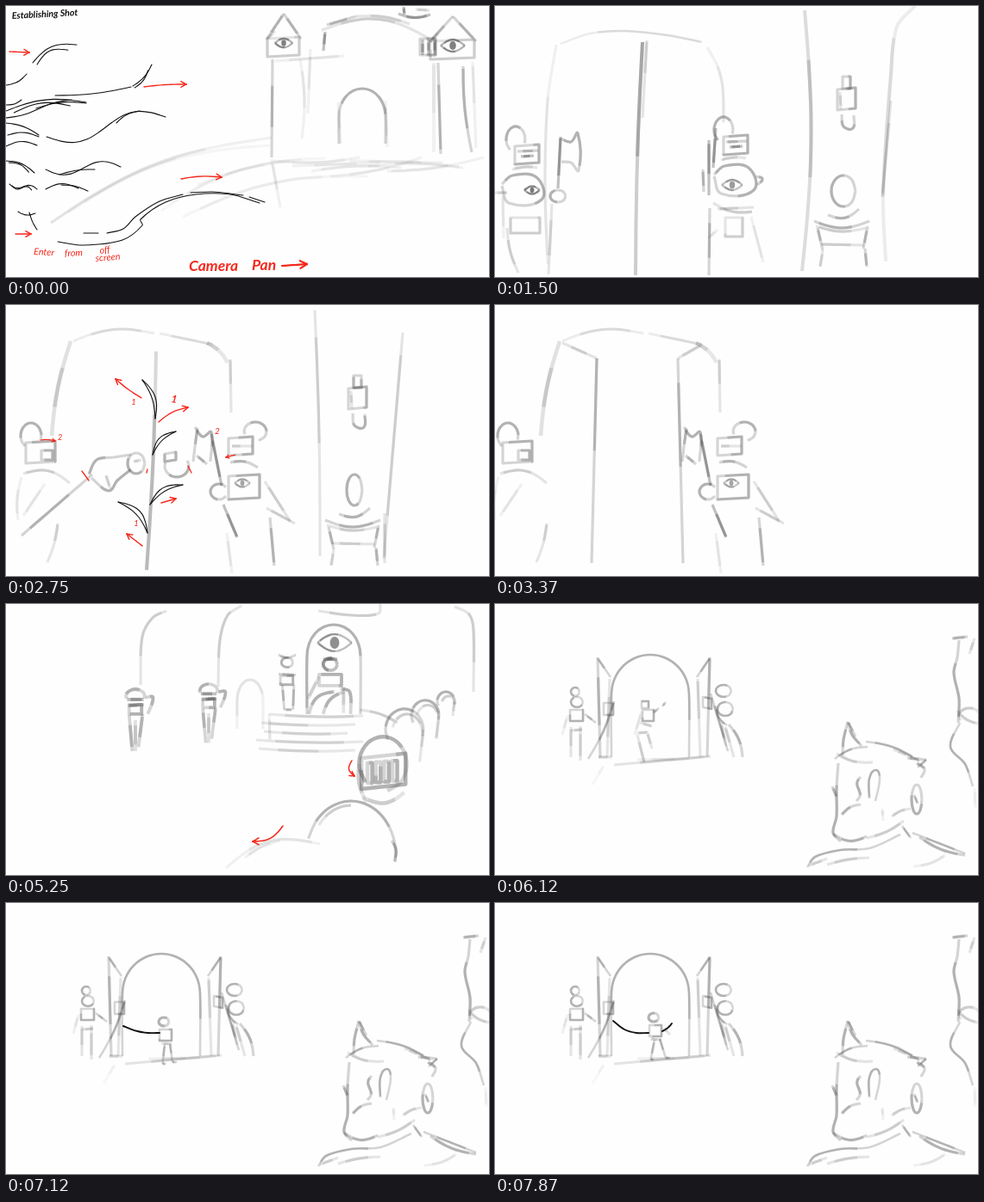
Recreate the animation shown at these times as an HTML page. Size 560 by 315 pixels, loop 8000 ms.

```html
<!DOCTYPE html>
<html lang="en">
<head>
<meta charset="utf-8">
<title>Storyboard</title>
<style>
html, body { margin: 0; width: 100%; height: 100%; overflow: hidden; background: #fefefe; }
svg { display: block; width: 100vw; height: 100vh; }
path { fill: none; stroke-linejoin: round; }
text { font-family: Lato, Inter, sans-serif; font-style: italic; }
</style>
</head>
<body>
<svg id="stage" viewBox="0 0 560 315"></svg>
<script>
const RED = '#f5281c', INK = '#111', PENCIL = '#4c4c4c', DUR = 8000, TAU = Math.PI * 2;

let seed = 7;
const rnd = () => (seed = seed * 16807 % 2147483647) / 2147483647;
const mix = (a, b, t) => a + (b - a) * t;
const times = (n, f) => Array.from({ length: n }, (_, i) => f(i, n > 1 ? i / (n - 1) : 0));
const parse = s => s.trim().split(/\s+/).map(p => p.split(',').map(Number));

// Smooth curve through points, with handles a third of each span long
function smooth(p) {
  const dir = i => {
    const a = p[Math.max(i - 1, 0)], b = p[Math.min(i + 1, p.length - 1)];
    const l = Math.hypot(b[0] - a[0], b[1] - a[1]) || 1;
    return [(b[0] - a[0]) / l, (b[1] - a[1]) / l];
  };
  let d = 'M' + p[0];
  for (let i = 1; i < p.length; i++) {
    const [a, b] = [p[i - 1], p[i]], [u, v] = [dir(i - 1), dir(i)];
    const l = Math.hypot(b[0] - a[0], b[1] - a[1]) / 3;
    const c = [a[0] + u[0] * l, a[1] + u[1] * l, b[0] - v[0] * l, b[1] - v[1] * l, ...b];
    d += 'C' + c.map(n => n.toFixed(1));
  }
  return d;
}

// A pen draws strokes; a soft one presses harder somewhere along the way
function pen(col, w, op = 1, soft = false) {
  const put = d => {
    const one = (o, more) => `<path d="${d}" stroke="${col}" stroke-width="${w}" stroke-opacity="${o.toFixed(2)}" ${more}/>`;
    if (!soft) return one(op, 'stroke-linecap="round"');
    const gap = (rnd() * .3).toFixed(2), run = (.4 + rnd() * .35).toFixed(2);
    return one(op * .58, '') + one(op * .62, `pathLength="1" stroke-dasharray="0 ${gap} ${run} 2"`);
  };
  const line = p => put(smooth(p));
  const round = (x, y, rx, ry, from, to) => times(9, (i, t) => {
    const a = TAU * mix(from, to, t);
    return [x + rx * Math.cos(a), y + ry * Math.sin(a)];
  });
  return {
    path: s => s.split('|').map(q => line(parse(q))).join(''),
    bow(x0, y0, x1, y1, bend = 0, humps = 1) {
      const l = Math.hypot(x1 - x0, y1 - y0);
      return line(times(2 + 4 * humps, (i, t) => {
        const k = bend * Math.sin(Math.PI * humps * t) / l;
        return [mix(x0, x1, t) - (y1 - y0) * k, mix(y0, y1, t) + (x1 - x0) * k];
      }));
    },
    ring: (x, y, rx, ry = rx, from = 0, to = 1) => line(round(x, y, rx, ry, from, to)),
    box: (x, y, w, h, tilt = 0) => put(`M${x},${y}L${x + w},${y - tilt}L${x + w},${y + h - tilt}L${x},${y + h}Z`),
    arch: (x, top, r, foot, rise = r) => line([[x - r, foot], ...round(x, top + rise, r, rise, .5, 1), [x + r, foot]])
  };
}
const gray = (op, w = 3.2) => pen(PENCIL, w, op, true);
const faint = gray(.13), light = gray(.24), mid = gray(.4), dark = gray(.6), fine = gray(.4, 2.6);
const ink = pen(INK, 1.1), red = pen(RED, 1.3), thin = pen(RED, 1);

const move = (x, y, body, sx = 1, sy = Math.abs(sx)) => `<g transform="translate(${x} ${y}) scale(${sx} ${sy})">${body}</g>`;
const word = (x, y, size, str, col = RED, turn = 0, weight = 400) =>
  `<text x="${x}" y="${y}" font-size="${size}" fill="${col}" font-weight="${weight}" transform="rotate(${turn} ${x} ${y})">${str}</text>`;
function arrow(x0, y0, x1, y1, bend = 0, w = 1.4, size = 7) {
  const p = pen(RED, w), a = Math.atan2(y1 - y0, x1 - x0) - bend * 3 / Math.hypot(x1 - x0, y1 - y0);
  const wing = k => p.bow(x1 - size * Math.cos(a + k), y1 - size * Math.sin(a + k), x1, y1);
  return p.bow(x0, y0, x1, y1, bend) + wing(.5) + wing(-.5);
}
function eye(x, y, r, op = .6) {
  const p = gray(op, 2.3);
  return p.bow(x - r, y, x + r, y, -r * .5) + p.bow(x - r, y, x + r, y, r * .5) +
    `<ellipse cx="${x}" cy="${y}" rx="${r * .27}" ry="${r * .35}" fill="${PENCIL}" fill-opacity="${op}"/>`;
}

// --- Castle ---
const tower = (x, r, top) =>
  mid.bow(x - r, top + 30, x, top) + mid.bow(x, top, x + r, top + 29) +
  light.box(x - r + 1, top + 29, r * 2 - 3, 21, 2) + light.bow(x - r, top + 30, x - r + 10, top + 20) + eye(x, top + 34, r * .52, .7);
const castle =
  faint.bow(52, 252, 308, 153, -20) + gray(.08).bow(72, 240, 306, 162, -20) + gray(.08).bow(180, 238, 330, 180, -12) +
  gray(.09).bow(205, 245, 420, 198, -16) + gray(.08).bow(222, 208, 370, 177, -8) +
  times(7, i => gray(.12).bow(310 + i * 22, 180 + i % 4 * 6, 410 + i * 24, 176 + i % 3 * 6, 4 - i % 3 * 4)).join('') +
  tower(322, 20, 9) + tower(518, 27, 12) +
  mid.bow(309, 62, 308, 176) + faint.bow(308, 178, 318, 234) + faint.bow(312, 64, 392, 58) +
  faint.bow(341, 62, 343, 154, -4) + faint.bow(353, 50, 350, 125) +
  dark.bow(370, 30, 368, 52) + mid.bow(372, 22, 406, 12) + light.bow(366, 28, 491, 38, -18) + light.bow(406, 12, 468, 21, -4) +
  dark.bow(455, 9, 492, 10, 4) + dark.bow(461, 1, 462, 10) + light.bow(475, 4, 491, 5) +
  times(3, i => dark.bow(483 + i * 7, 39, 483 + i * 7, 57)).join('') + mid.box(480, 38, 18, 19) +
  mid.bow(501, 66, 504, 172) + mid.bow(530, 70, 540, 170, 3) + gray(.12, 4).bow(496, 66, 496, 170) + faint.bow(541, 65, 545, 165) +
  mid.arch(413, 96, 27, 160, 32) + faint.bow(385, 112, 388, 160) + faint.bow(440, 110, 442, 164);

// Each wave is a broken line, some with a second try beside it
const wave = (x0, y0, x1, y1, bend, humps = 1, again = false) =>
  ink.bow(x0, y0, x1, y1, bend, humps) + (again ? ink.bow(mix(x0, x1, .1), y0 + 2, mix(x0, x1, .8), mix(y0, y1, .8) + 2, bend * .9, humps) : '');
const waves =
  wave(31, 66, 82, 45, -9, 1, true) + wave(0, 92, 24, 79, 3) + wave(147, 93, 169, 68, 3, 1, true) + wave(57, 104, 145, 94, 3) +
  wave(0, 122, 93, 112, -8, 1, true) + wave(0, 130, 76, 109, 2, 2) + wave(0, 115, 18, 109, 2) + wave(35, 119, 93, 113, -4) +
  wave(0, 136, 38, 150, -3) + wave(2, 150, 38, 152, -4) + wave(0, 163, 36, 162, -5) + wave(47, 152, 185, 129, 12, 2) +
  wave(128, 136, 155, 122, -3) + wave(0, 180, 33, 194, -4, 1, true) + wave(46, 190, 133, 187, 7, 2) + wave(62, 196, 103, 190, -2) +
  wave(4, 207, 36, 213, 3, 2, true) + wave(46, 213, 84, 212, -6) + wave(64, 208, 95, 215, -2) +
  wave(27, 240, 36, 260, 1) + wave(14, 239, 34, 241, 3) +
  ink.path('60,274 90,278 135,272 158,255 156,248 185,228 220,219 260,219 294,229|90,264 107,264|117,264 136,259 150,245 178,227 205,219|214,217 240,216 275,220|282,222 300,228');

const pan = castle + waves + word(7, 15, 10.6, 'Establishing Shot', INK, -3, 700) +
  arrow(4, 53, 27, 54) + arrow(160, 94, 209, 91, -1) + arrow(203, 201, 250, 199, -2) + arrow(11, 265, 29, 265) + arrow(320, 302, 349, 300, 0, 2.2, 9) +
  word(32, 289, 10.8, 'Enter', RED, 3) + word(68, 291, 10.8, 'from', RED, -2) +
  word(109, 288, 10.8, 'off', RED, -8) + word(104, 297, 10.8, 'screen', RED, -5) +
  word(212, 308, 17.5, 'Camera', RED, 0, 700) + word(285, 307, 17.5, 'Pan', RED, 0, 700);

// --- Great doors ---
const bust = (x, y, helm, low) =>
  mid.ring(x + helm, y - 8, 11, 15, .35, 1.05) + mid.box(x, y, 28, 21, 2) + dark.bow(x + 7, y + 12, x + 22, y + 11) + mid.bow(x + 3, y + 6, x + 27, y + 5) +
  light.bow(x - 3, y + 27, x + 26, y + 25, -2) + mid.path(`${x + low},${y + 44} ${x + low + 12},${y + 34} ${x + low + 40},${y + 36} ${x + low + 46},${y + 62} ${x + low + 8},${y + 66} ${x + low},${y + 46}`);
function statue(head) {
  return mid.box(403, 82, 9, 14) + mid.box(397, 97, 21, 24, 2) + light.bow(400, 100, 401, 120) + mid.path('402,126 404,140 415,142 416,127') +
    mid.ring(404, 215, head, 18) + mid.bow(386, 243, 422, 236, 7) + mid.bow(370, 250, 434, 250, 8) + light.bow(372, 256, 430, 258, 5) +
    mid.bow(374, 258, 380, 284) + mid.bow(432, 256, 427, 282) + light.bow(378, 277, 428, 278) + light.bow(380, 284, 377, 303) + mid.bow(429, 282, 431, 303);
}
const hall =
  faint.path('61,300 58,210 61,110 71,45') + faint.path('246,48 258,70 264,95 265,136') + gray(.17, 2.5).path('76,44 110,32 150,29 200,34 240,42') + light.bow(66, 230, 62, 312) +
  gray(.48, 4).bow(171, 42, 163, 313, 2) + light.bow(176, 40, 171, 130) +
  bust(23, 163, 1, -15) + eye(43, 214, 9, .75) + bust(265, 152, 0, -11) + eye(275, 208, 12, .55) +
  dark.bow(76, 152, 73, 212) + mid.path('76,154 88,158 96,148 97,191 88,182 77,181') + mid.ring(73, 221, 9, 7) + light.bow(0, 217, 14, 217) +
  light.box(18, 246, 34, 18) + light.box(267, 246, 20, 22) + faint.bow(9, 220, 10, 270) + light.bow(14, 258, 27, 310, 3) +
  dark.bow(248, 156, 248, 220) + dark.bow(256, 142, 253, 188) + mid.bow(241, 190, 242, 216) + mid.bow(249, 235, 248, 313) +
  mid.path('302,198 310,201 304,208') + light.bow(258, 236, 300, 234) + light.bow(253, 229, 298, 239, 5) + faint.bow(297, 245, 311, 298) + faint.bow(258, 260, 247, 270) +
  gray(.33, 4).bow(359, 5, 356, 308, -9) + gray(.17, 4).path('487,0 466,24 459,80 450,220 453,297') + light.bow(459, 110, 449, 222) + statue(14);

const frame =
  gray(.27, 4.5).bow(75, 42, 53, 152, 4) + gray(.17, 3).bow(78, 42, 172, 33, -9) + gray(.17, 3).bow(178, 33, 240, 46) +
  gray(.22, 4.5).bow(233, 44, 257, 67, -3) + light.bow(260, 63, 261, 125) + light.bow(60, 254, 48, 299, -2);
const guardL = mid.ring(29, 152, 12, 15, .35, 1.05) + mid.box(23, 160, 34, 24, 2) + mid.box(41, 169, 13, 11) +
  light.bow(20, 196, 74, 207, -9) + faint.bow(18, 200, 14, 250, 3) + faint.bow(45, 208, 20, 245);
const spear = mid.bow(18, 268, 100, 197) + mid.path('96,197 105,180 125,177 145,174|99,201 119,216 129,204 145,191') + light.bow(116, 198, 121, 214) +
  mid.ring(151, 184, 10, 12) + light.bow(148, 182, 157, 180);
const guardR =
  mid.path('222,143 219,165 217,182|219,142 228,153 238,148 237,182|221,175 233,185') + mid.ring(289, 147, 13, 11, .45, 1.2) + mid.box(258, 155, 28, 20, 2) + light.bow(262, 164, 286, 164) +
  mid.bow(260, 183, 292, 189, -4) + mid.box(258, 199, 36, 27, 2) + mid.ring(247, 217, 10, 9, .1, .9) + dark.bow(238, 150, 250, 210) + dark.bow(252, 232, 268, 270) + eye(274, 207, 9, .5) +
  light.bow(300, 205, 330, 252) + light.bow(302, 236, 335, 254) + faint.bow(256, 265, 262, 312) + mid.bow(306, 247, 311, 303);
const leaf = (x0, y0, x1, y1, bend) => ink.bow(x0, y0, x1, y1, bend) + ink.bow(x0, y0, x1, y1, bend * .5);
const doors = frame + guardL + spear + guardR + mid.box(184, 173, 13, 9, 2) + mid.ring(198, 187, 14, 13, -.08, .55) +
  gray(.36, 4).bow(174, 54, 163, 308, -2) + light.bow(358, 6, 364, 292, -2) + light.bow(460, 32, 438, 295) + light.bow(439, 242, 439, 300) + statue(9) +
  leaf(173, 132, 158, 87, 8) + leaf(170, 174, 197, 147, -8) + leaf(167, 232, 205, 209, -9) + leaf(164, 265, 130, 229, 11) +
  arrow(157, 108, 127, 86, -1) + arrow(177, 136, 211, 119, -3) + arrow(180, 230, 197, 225) + arrow(158, 280, 140, 266) +
  arrow(40, 157, 57, 158, -1, 1.2, 4) + arrow(266, 174, 255, 177, 0, 1.2, 4) + red.path('88,193 96,204|164,191 163,195|211,187 215,195') +
  word(145, 116, 10, '1') + word(191, 113, 12, '1', RED, 8, 700) + word(148, 257, 10, '1') + word(60, 157, 9, '2') + word(242, 150, 10, '2');
const ajar = frame + move(-14, 0, guardL) + guardR + light.path('78,44 118,62|240,46 212,62') + mid.bow(118, 62, 112, 300) + mid.bow(212, 62, 218, 300);

// --- Throne room ---
const sentry = (x, y, s, p = mid) => move(x, y, p.ring(0, 7, 9, 7, .45, 1.05) + dark.bow(-8, 10, 8, 10) + dark.bow(-7, 16, 8, 15) + p.box(-6, 15, 12, 9) +
  p.bow(-6, 25, -3, 60) + p.bow(7, 24, 3, 56) + gray(.3).bow(0, 30, 0, 60) + p.path('10,8 17,8 12,24'), s);
const page = (x, y, s) => move(x, y, fine.bow(-9, 0, 9, 0, 3) + fine.ring(0, 8, 6, 5) + fine.bow(-9, 20, 9, 21) + fine.box(-7, 22, 13, 9) +
  fine.bow(-5, 31, -3, 57) + fine.bow(7, 31, 6, 57) + fine.bow(-3, 57, 5, 57), s);
const ruler = (x, y, s) => move(x, y, dark.ring(0, 6, 7, 6) + dark.bow(-7, 1, 7, 1) + mid.box(-11, 16, 22, 11) + mid.bow(-21, 55, 4, 33, -7) +
  mid.bow(-7, 55, 14, 33, -5) + mid.path('10,30 19,33 20,55') + light.bow(13, 28, 13, 54) + light.bow(-11, 18, -22, 40), s);
const visor = (x, y, s) => move(x, y, mid.ring(0, 0, 20, 23, .38, 1.22) + mid.box(-18, -5, 37, 26, 4) +
  times(4, i => mid.box(-13 + i * 7, -1 - i * .6, 4, 17)).join('') + light.bow(-17, 28, 18, 24, 7) + light.bow(-20, 0, -14, 32, 3), s);
const row = (x0, y0, x1, y1, r0, r1, n) => times(n, (i, t) => {
  const x = mix(x0, x1, t), y = mix(y0, y1, t), r = mix(r0, r1, t);
  return mid.ring(x, y, r, r * 1.1, .42, 1.05) + light.ring(x + 3, y + 4, r * .8, r, .55, 1) + light.bow(x + r, y, x + r * .8, y + r * 1.7);
}).join('');
const dais = (x0, x1, y, step) => times(5, (i, t) => gray(.22).bow(x0 - i * 3 - i % 2 * 6, y + i * step, x1 - i % 3 * 9, y + 2 + i * step, 2)).join('') +
  faint.bow(x0, y, x0 + 1, y + step * 3);

const throne =
  faint.path('245,0 218,14 206,40 201,90') + faint.bow(213, 10, 208, 80) + light.path('296,0 283,10 278,30 278,95') +
  light.path('357,0 362,10 400,11 450,9 452,2') + light.path('513,0 535,6 543,22 544,82') +
  sentry(198, 88, 1.08, gray(.5, 4)) + sentry(272, 84, 1) + faint.arch(313, 77, 14, 126, 20) + fine.arch(400, 20, 30, 109, 32) +
  eye(401, 42, 18, .72) + page(353, 52, 1) + ruler(394, 56, 1) + dais(338, 440, 117, 9) + faint.bow(302, 136, 338, 131) + faint.bow(315, 151, 330, 148) +
  gray(.06, 3).bow(176, 212, 318, 160) + gray(.06, 3).bow(235, 314, 330, 230) + faint.bow(325, 228, 415, 160) + gray(.1, 2.5).bow(350, 208, 410, 163) +
  row(482, 138, 518, 94, 22, 8, 4) + faint.ring(485, 92, 14, 14, .5, .9) + visor(440, 162, 1) +
  light.bow(474, 150, 476, 192) + light.bow(502, 130, 497, 196) + faint.ring(360, 294, 80, 55, .55, .97) + faint.bow(389, 258, 432, 283, 4) +
  mid.ring(450, 282, 64, 66, .52, 1) + light.ring(450, 284, 56, 66, .58, .78) + mid.bow(500, 262, 503, 300, -8) + light.bow(516, 267, 507, 296) +
  thin.bow(50, 150, 52, 258, 2) + thin.path('57,268 120,269 160,272 208,273') + arrow(22, 298, 44, 277, 0, 2.2, 11) + word(50, 302, 18, 'slow') + word(99, 302, 19, 'zoom');

const closer =
  light.path('186,8 170,16 158,38 156,94') + light.path('273,2 257,13 248,42 246,96') + light.path('362,8 400,13 432,11 434,0') + light.path('520,3 537,12 542,30 542,102') +
  sentry(150, 99, 1.2) + sentry(235, 93, 1.14) + faint.arch(283, 88, 15, 145, 24) + mid.arch(380, 24, 31, 128, 36) +
  eye(381, 45, 20, .62) + page(326, 59, 1.12) + ruler(376, 63, 1.18) + dais(305, 414, 128, 10) + light.bow(410, 123, 454, 138, -3) +
  row(462, 146, 510, 113, 22, 10, 3) + visor(437, 186, 1.38) +
  mid.ring(400, 292, 52, 63, .55, 1.02) + light.ring(400, 290, 46, 56, .6, .75) + mid.bow(447, 275, 450, 299, -4) + faint.bow(255, 307, 364, 279, -18) + faint.bow(277, 295, 318, 275, -3) +
  arrow(401, 182, 404, 200, 5, 1.5, 6) + arrow(321, 258, 286, 276, -6, 1.6, 8);

// --- Gate and watching king ---
const keeper = (x, y, side) => move(x, y, fine.ring(0, 4, 5) + fine.ring(2, 16, 7, 6) + fine.box(-6, 25, 15, 13) +
  fine.bow(11, 30, 24, 40) + fine.bow(45, 15, 15, 82, -3) + fine.box(33, 17, 11, 14) +
  light.bow(-5, 45, -5, 80) + light.bow(6, 44, 6, 84) + faint.bow(-9, 32, -15, 54) + light.bow(-5, 49, 8, 48), side);
const leaves = [-1, 1].map(k => move(184, 0, mid.bow(-65, 62, -62, 178) + fine.path('-65,63 -50,85') + light.bow(-51, 87, -54, 178), k)).join('');
const gate = fine.arch(180, 59, 45, 178, 46) + leaves + light.bow(120, 178, 135, 178) + light.bow(138, 187, 250, 177) + faint.bow(165, 181, 225, 180) + gray(.07).bow(126, 188, 113, 210) +
  keeper(93, 98, 1) + move(172, -2, '') + move(265, 95, fine.ring(0, 6, 9, 7) + fine.ring(2, 27, 9, 8) + fine.box(-24, 13, 10, 12, -2) +
  fine.bow(-15, 9, 5, 76) + fine.bow(-8, 24, 4, 46, 4) + light.bow(-3, 43, 3, 70) + mid.bow(6, 45, 22, 83, -4) + light.bow(2, 48, 12, 83));
const king =
  mid.path('403,176 404,158 409,137|409,137 414,152 425,165') + fine.bow(410, 138, 418, 154) + fine.bow(394, 180, 432, 166, -4) + fine.bow(430, 160, 492, 183, -5) + mid.bow(478, 179, 500, 181) + fine.bow(500, 181, 490, 190) +
  light.bow(396, 174, 438, 184, 4) + light.bow(462, 169, 484, 178) + mid.path('398,185 396,215 396,247 392,266 401,276') + mid.bow(392, 267, 431, 270, 7) + light.bow(431, 272, 474, 252, 3) +
  light.bow(460, 247, 482, 238, -2) + faint.bow(449, 238, 450, 252) + mid.path('489,185 498,192 494,202') + fine.path('434,226 434,203 442,193 446,204 441,229') + mid.bow(402, 245, 424, 233, -3) +
  mid.bow(424, 201, 419, 229, 3, 2) + mid.ring(489, 227, 6, 17) + fine.bow(486, 222, 490, 232) + mid.bow(391, 212, 396, 224) +
  fine.path('362,306 371,294 400,286 434,284 470,268') + light.bow(364, 304, 385, 296) + light.bow(385, 303, 434, 295, -2) + fine.bow(472, 258, 482, 272) + fine.bow(484, 266, 545, 290) + mid.bow(492, 271, 545, 292, 4) + faint.bow(485, 305, 522, 292, 3) +
  mid.bow(530, 40, 548, 38) + mid.path('538,42 536,62 532,80 538,110 537,138') + fine.path('539,138 528,166 545,186 554,212') + light.bow(556, 40, 550, 58) + light.ring(550, 130, 12, 9, .4, 1) + light.bow(536, 124, 560, 139, 3) + gray(.08).bow(556, 214, 557, 237);
const court = gate + king;

const walker = (x, y, lean, step) => move(x, y, mid.ring(lean, 6, 6, 5) + fine.box(-6, 15, 14, 13) + light.bow(-4, 31, 8, 32) +
  fine.bow(6, 31, 4 + step, 53) + fine.bow(0, 32, -step / 2, 55) + fine.bow(4 + step, 53, 9 + step, 53) + fine.bow(-step / 2, 55, 4 - step / 2, 55));
const leap = move(176, 112, fine.box(-6, 1, 8, 8) + fine.box(-5, 11, 13, 13) + fine.path('8,14 14,9|18,7 22,2') +
  light.bow(-8, 26, 6, 30) + light.bow(-11, 38, 2, 37) + light.bow(-11, 40, -3, 72) + light.bow(1, 39, 6, 56) + faint.bow(-6, 13, -14, 40));
const whip = pen(INK, 1.9);
const arms = whip.path('137,137 150,147 164,151 178,151') + whip.bow(194, 149, 205, 140, 1);
const lash = whip.path('128,94 134,118 150,140 178,150') + whip.bow(194, 148, 521, 233, -25);

const shots = [
  [0, pan], [1500, hall], [2750, doors], [3370, ajar], [4120, throne], [5250, closer], [6120, court + leap],
  [6370, court + walker(178, 129, 2, 12)], [6620, court + walker(179, 134, 0, 4)], [6870, court + walker(182, 134, -1, 10)],
  [7120, court + walker(184, 132, -1, 5) + whip.bow(136, 143, 178, 151, 3)], [7370, court + walker(185, 129, -1, 7) + lash],
  [7620, court + walker(185, 129, -1, 7) + arms], [7870, court + walker(185, 127, -1, 9) + arms + light.bow(196, 146, 203, 153)]
];

const stage = document.getElementById('stage');
stage.innerHTML = '<rect width="560" height="315" fill="#fefefe"/>' + shots.map(s => `<g class="shot" display="none">${s[1]}</g>`).join('');
const layers = stage.querySelectorAll('.shot');

function render(ms) {
  const t = ms % DUR, now = shots.findLastIndex(s => s[0] <= t);
  layers.forEach((g, i) => g.setAttribute('display', i === now ? 'inline' : 'none'));
}

render(0);
let start;
requestAnimationFrame(function tick(now) {
  start ??= now;
  render(Math.max(0, now - start));
  requestAnimationFrame(tick);
});
</script>
</body>
</html>
```
